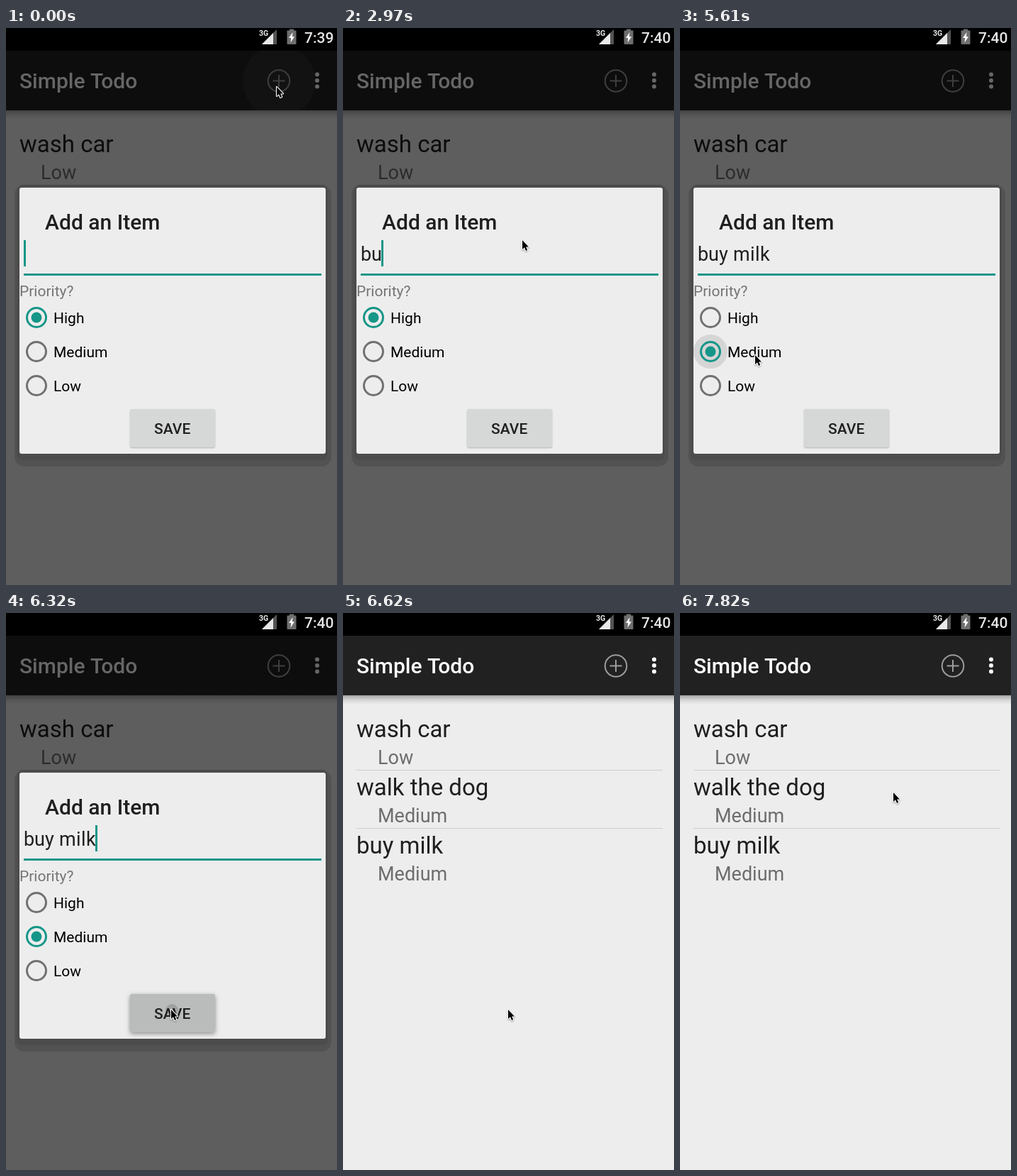
Animation of 467x785 px, one loop 8000 ms. Source, as an HTML page with a canvas:

```html
<!DOCTYPE html>
<html lang="en">
<head>
<meta charset="utf-8">
<title>Simple Todo</title>
<style>
  html, body { margin: 0; width: 100%; height: 100%; overflow: hidden; background: #000; }
  canvas { display: block; }
</style>
</head>
<body>
<canvas id="stage" width="467" height="785"></canvas>
<script>
const ctx = document.getElementById('stage').getContext('2d');
const W = 467, H = 785, LOOP = 8000;
const TEAL = '#159688', PAPER = '#ededed', INK = '#1f1f1f', GREY = '#6d6d6d';

// [time, typed text]
const TYPING = [[0, ''], [2820, 'b'], [2970, 'bu'], [3270, 'buy'],
  [3420, 'buy m'], [3710, 'buy mi'], [4010, 'buy milk']];

// Moments at which the caret goes off, on, off, ...
const BLINKS = [300, 750, 1340, 1780, 2380, 2820, 4610, 5030, 5610, 6050];

// Pointer moves: start, step length, step count, destination
const HOME = [382, 83];
const MOVES = [
  [150, 150, 3, [253, 299]],
  [4750, 140, 5, [106, 461]],
  [5760, 145, 3, [233, 559]],
  [6920, 150, 7, [301, 253]]
];

const ease = u => u * u * (3 - 2 * u);

function pointerAt(t) {
  let pos = HOME;
  for (const [start, step, count, to] of MOVES) {
    if (t < start) break;
    const k = ease(Math.min(1, (Math.floor((t - start) / step) + 1) / (count + 0.0)));
    pos = pos.map((v, i) => v + (to[i] - v) * k);
  }
  return pos.map(Math.round);
}

const typedAt = t => TYPING.filter(e => e[0] <= t).pop()[1];
const caretOn = t => BLINKS.filter(b => b <= t).length % 2 === 0;

function setFont(size, weight = 400) {
  ctx.font = `${weight} ${size}px Roboto, "Noto Sans", sans-serif`;
}

function text(str, x, y, size, color, weight) {
  setFont(size, weight);
  ctx.fillStyle = color;
  ctx.fillText(str, x, y);
}

function rect(x, y, w, h, color) {
  ctx.fillStyle = color;
  ctx.fillRect(x, y, w, h);
}

function panel(x, y, w, h, r, color) {
  ctx.fillStyle = color;
  ctx.beginPath();
  ctx.roundRect(x, y, w, h, r);
  ctx.fill();
}

function disc(x, y, r, color) {
  ctx.fillStyle = color;
  ctx.beginPath();
  ctx.arc(x, y, r, 0, Math.PI * 2);
  ctx.fill();
}

function ring(x, y, r, width, color) {
  ctx.strokeStyle = color;
  ctx.lineWidth = width;
  ctx.beginPath();
  ctx.arc(x, y, r, 0, Math.PI * 2);
  ctx.stroke();
}

function polygon(points, color) {
  ctx.fillStyle = color;
  ctx.beginPath();
  points.forEach(([x, y]) => ctx.lineTo(x, y));
  ctx.closePath();
  ctx.fill();
}

function drawList(t) {
  rect(0, 0, W, H, PAPER);
  const items = [['wash car', 'Low'], ['walk the dog', 'Medium']];
  if (t >= 6470) items.push(['buy milk', 'Medium']);
  items.forEach(([name, priority], i) => {
    const y = 140 + i * 82;
    text(name, 19, y + 35, 33, INK);
    text(priority, 49, y + 73, 27, GREY);
    if (i < items.length - 1) rect(19, y + 81, 432, 1, '#cdcdcd');
  });
}

function drawHeader(t) {
  const shade = ctx.createLinearGradient(0, 116, 0, 129);
  shade.addColorStop(0, 'rgba(0,0,0,.3)');
  shade.addColorStop(0.5, 'rgba(0,0,0,.1)');
  shade.addColorStop(1, 'rgba(0,0,0,0)');
  rect(0, 116, W, 13, shade);
  rect(0, 32, W, 84, '#212121');
  if (t < 150) {
    ctx.save();
    ctx.beginPath();
    ctx.rect(0, 32, W, 84);
    ctx.clip();
    disc(385, 75, 51, 'rgba(255,255,255,.05)');
    ctx.restore();
  }
  text('Simple Todo', 19, 85, 30, '#fff', 500);
  ring(385, 74.5, 15.3, 2, '#9c9c9c');
  rect(376.5, 73.5, 17, 2, '#9c9c9c');
  rect(384, 66, 2, 17, '#9c9c9c');
  for (const y of [65.5, 74, 82.5]) disc(439, y, 3, '#fff');
}

function drawStatus(t) {
  rect(0, 0, W, 32, '#000');
  text('3G', 357, 11, 10.5, '#e8e8e8', 700);
  polygon([[361, 23], [382, 2], [382, 23]], '#555');
  polygon([[361, 23], [377, 7], [377, 23]], '#e8e8e8');
  rect(400, 1.5, 6, 3, '#6f6f6f');
  panel(396.5, 3.5, 13, 19.5, 1, '#6f6f6f');
  polygon([[404.5, 6], [399, 14], [402.2, 14], [401.5, 20.5], [407, 12.3], [403.8, 12.3]], '#fff');
  text(t < 1640 ? '7:39' : '7:40', 421, 21, 21, '#e8e8e8', 500);
}

// Glyph advances snap to whole pixels, as in the device's text field.
function drawInput(t) {
  let x = 25;
  setFont(27);
  ctx.fillStyle = INK;
  for (const ch of typedAt(t)) {
    ctx.fillText(ch, x, 328);
    x += Math.round(ctx.measureText(ch).width);
  }
  if (caretOn(t)) rect(Math.max(25, x - 1), 299, 3, 37, TEAL);
  rect(25, 346, 420, 3, TEAL);
}

function drawRadios(t) {
  const chosen = t < 5610 ? 0 : 1;
  if (t >= 5610 && t < 5905) disc(43, 456, 24, `rgba(0,0,0,${t < 5760 ? 0.1 : 0.04})`);
  ['High', 'Medium', 'Low'].forEach((label, i) => {
    const y = 408 + i * 48, on = i === chosen;
    ring(43, y, 13.5, 3, on ? TEAL : '#717171');
    if (on) disc(43, y, 7.5, TEAL);
    text(label, 67, y + 8, 21, '#000');
  });
}

function drawButton(t) {
  const pressed = t >= 6320;
  ctx.save();
  ctx.shadowColor = pressed ? 'rgba(0,0,0,.4)' : 'rgba(0,0,0,.25)';
  ctx.shadowBlur = pressed ? 6 : 2;
  ctx.shadowOffsetY = pressed ? 2 : 1;
  panel(175, 537, 120, 54, 3, pressed ? '#babbbb' : '#d6d7d7');
  ctx.restore();
  if (pressed) disc(234, 560, 9, 'rgba(0,0,0,.14)');
  text('SAVE', 209, 572, 21, INK, 500);
}

function drawDialog(t) {
  panel(12, 221, 447, 397, 14, 'rgba(0,0,0,.13)');
  panel(15, 222, 439, 387, 8, 'rgba(0,0,0,.08)');
  panel(19, 225, 432, 375, 3, PAPER);
  text('Add an Item', 55, 284, 30, INK, 500);
  drawInput(t);
  text('Priority?', 19, 378, 21, '#757575');
  drawRadios(t);
  drawButton(t);
}

function drawPointer(t) {
  const [x, y] = pointerAt(t);
  const arrow = new Path2D('M0 0V13L3 10.2 5 15 7.2 14 5.2 9.4H9Z');
  ctx.save();
  ctx.translate(x, y);
  ctx.lineJoin = 'round';
  ctx.lineWidth = 2.2;
  ctx.strokeStyle = '#fff';
  ctx.shadowColor = 'rgba(0,0,0,.35)';
  ctx.shadowBlur = 2;
  ctx.shadowOffsetY = 1;
  ctx.stroke(arrow);
  ctx.shadowColor = 'transparent';
  ctx.fillStyle = '#000';
  ctx.fill(arrow);
  ctx.restore();
}

function draw(t) {
  const dim = t < 6470 ? 0.6 : t < 6620 ? 0.225 : 0;
  drawList(t);
  drawHeader(t);
  rect(0, 0, W, H, `rgba(0,0,0,${dim})`);
  drawStatus(t);
  if (dim) {
    ctx.globalAlpha = t < 6470 ? 1 : 0.04;
    drawDialog(t);
    ctx.globalAlpha = 1;
  }
  drawPointer(t);
}

const begin = performance.now();
function tick() {
  draw((performance.now() - begin) % LOOP);
  requestAnimationFrame(tick);
}
tick();
</script>
</body>
</html>
```
